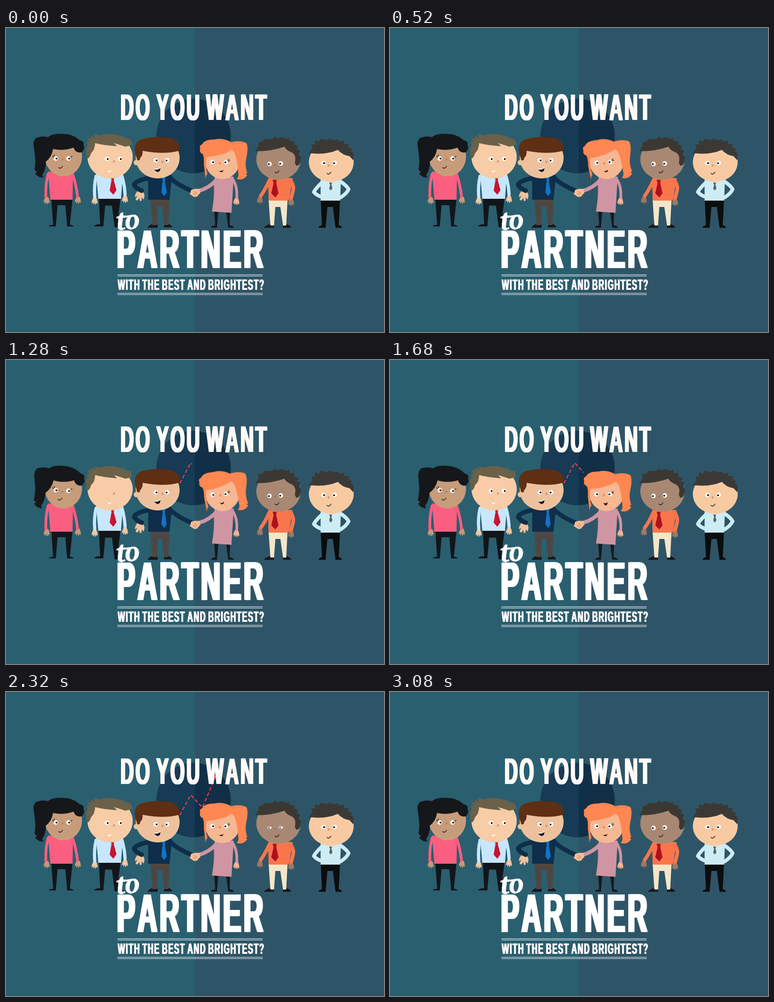
Animation, 835 px wide and 671 px high, one loop 3.12 s. Source, as an HTML page:

```html
<!DOCTYPE html>
<html lang="en">
<head>
<meta charset="utf-8">
<title>Partner</title>
<style>
@property --d { syntax: "<number>"; inherits: true; initial-value: 0; }

html, body { margin: 0; width: 100%; height: 100%; overflow: hidden; background: #2e5567; }
.stage { position: relative; width: 835px; height: 671px; overflow: hidden; }
svg { position: absolute; inset: 0; }

/* Narrow heavy lettering shared by all three lines */
.line {
  position: absolute; white-space: nowrap; color: #fff;
  font: bold 1px/1 "Liberation Sans", Arial, sans-serif;
  font-kerning: none; letter-spacing: .1em; word-spacing: -.113em;
  transform: scaleX(.496); transform-origin: 0 0;
  text-shadow: .044em 0, -.044em 0, .022em 0, -.022em 0;
}
.ask { left: 253px; top: 134px; font-size: 81.4px; color: #fffaf7; }
.big { left: 244.5px; top: 427.6px; font-size: 121px; letter-spacing: .092em; }
.tail { left: 247px; top: 549.2px; font-size: 34px; }
.to {
  position: absolute; left: 244px; top: 389px; color: #fff;
  font: italic bold 66px/1 "Liberation Serif", "Times New Roman", serif;
  -webkit-text-stroke: .8px #fff;
  transform: rotate(-4deg);
}
.to::before {
  content: ""; position: absolute; left: 0; top: 25px; width: 40px; height: 4px;
  border-radius: 2px; background: #fff; transform: rotate(-3deg);
}
.rule { position: absolute; left: 246px; width: 321px; height: 2px; border: solid #fff; border-width: 1px 0; }

.arm { fill: none; stroke-linecap: round; stroke-linejoin: round; }
.nose { fill: none; stroke: #a5593c; stroke-width: 1; stroke-linecap: round; }
.smile { fill: none; stroke: #1b1210; stroke-width: 1.5; stroke-linecap: round; }

.eyes { transform-box: fill-box; transform-origin: center; animation: blink 3120ms linear infinite; }
.tilt { animation: 3120ms ease-in-out infinite; }
.left-girl { transform-origin: 124px 284px; animation-name: nod; }
.red-girl { transform-origin: 478px 292px; animation-name: sway; }
.open { animation: talk 3120ms step-end infinite; }
.closed { animation: hush 3120ms step-end infinite; }
.graph { animation: grow 3120ms linear infinite, fade 3120ms linear infinite; }
.reveal { stroke-dasharray: 100 200; stroke-dashoffset: calc((100 - var(--d)) * 1px); animation: grow 3120ms linear infinite; }
.head {
  offset-path: path("M384 272L408 227L434 255L463 186");
  offset-distance: calc(var(--d) * 1%);
  animation: head 3120ms step-end infinite;
}

@keyframes blink { 0%, 7.7%, 100% { transform: none; } 2.6%, 5.1% { transform: scaleY(0); } }
@keyframes nod { 0%, 18%, 71.5%, 100% { transform: none; } 25%, 64% { transform: rotate(3.5deg); } }
@keyframes sway { 0%, 1.3%, 53%, 100% { transform: none; } 7%, 43.6% { transform: rotate(-4deg); } }
@keyframes talk { 0%, 61% { opacity: 0; } 50% { opacity: 1; } }
@keyframes hush { 0%, 61% { opacity: 1; } 50% { opacity: 0; } }
@keyframes grow {
  0%, 17.9% { --d: 0; }
  25.6% { --d: 21.3; }
  33.3%, 43.6% { --d: 31; }
  53.8% { --d: 48.8; }
  57.7% { --d: 54.4; }
  70.5%, 100% { --d: 100; }
}
@keyframes fade { 0%, 86% { opacity: 1; } 96%, 100% { opacity: 0; } }
@keyframes head { 0%, 33% { opacity: 0; } 19%, 60% { opacity: 1; } }
</style>
</head>
<body>
<div class="stage">
<svg width="835" height="671" viewBox="0 0 835 671">
  <defs>
    <g id="eye-r"><circle r="4.9" fill="#fff"/><circle cx="1.6" cy=".3" r="2.1" fill="#17120f"/></g>
    <g id="eye-l"><circle r="4.9" fill="#fff"/><circle cx="-1.4" cy=".5" r="2.1" fill="#17120f"/></g>
    <path id="hand" d="M-3-7H3Q6-3 6 2Q7 6 5 7Q3 6 3 3Q3 8 1 9Q-1 8 0 3Q-2 8-4 8Q-5 6-3 2Q-5 6-7 5Q-7 1-3-7Z"/>
    <path id="nose" class="nose" d="M-1-2Q2-3 2 0Q1 2-1 1"/>
    <path id="smile" class="smile" d="M-5 0Q0 4 4-3"/>
    <mask id="drawn" maskUnits="userSpaceOnUse" x="0" y="0" width="835" height="671">
      <path class="reveal" pathLength="100" d="M384 272L408 227L434 255L463 186" fill="none" stroke="#fff" stroke-width="8"/>
    </mask>
  </defs>

  <path fill="#2a5f70" d="M0 0H417.5V671H0Z"/>
  <path fill="#2e5567" d="M417.5 0H835V671H417.5Z"/>
  <circle cx="414.5" cy="238.5" r="82" fill="#112f46"/>
  <path fill="#173a55" d="M417.5 156.55A82 82 0 1 0 417.5 320.45Z"/>

  <g class="graph">
    <path mask="url(#drawn)" d="M384 272L408 227L434 255L463 186" fill="none" stroke="#f23d57" stroke-width="2.4" stroke-dasharray="8 5"/>
    <path class="head" d="M-3-3L4 0L-3 3Z" fill="#f23d57"/>
  </g>

  <!-- Woman in pink -->
  <g>
    <path fill="#12161a" d="M100 376H147L141 434Q149 435 149 438H135L131 391H114L110 438H94Q95 435 104 434Z"/>
    <g fill="#c59a7a"><use href="#hand" x="90" y="380"/><use href="#hand" x="159" y="379"/></g>
    <path fill="#fb5f80" d="M93 317H148L147 379H98Z"/>
    <path class="arm" stroke="#fb5f80" stroke-width="6" d="M93 322Q87 345 88 373M147 322Q155 345 158 372"/>
    <g class="tilt left-girl">
      <ellipse cx="127" cy="284" rx="41" ry="43.500" fill="#c79c7b"/>
      <path fill="#15171a" d="M88 295Q101 285 104 267Q128 272 149 264Q154 276 164 275Q171 274 169 271Q175 266 171 259Q174 250 163 248C150 236 136 233 118 233.500Q99 234 93 241Q80 237 66 243Q58 251 62 267Q67 295 63 314Q72 317 64 321Q71 331 84 330Q78 327 82 321Q88 311 88 295Z"/>
      <use href="#eye-r" x="110" y="288"/><use href="#eye-r" x="138" y="288"/>
      <path class="smile" d="M105 285l-2-2M107 283l-1-3M143 285l3-2"/>
      <use href="#nose" x="124" y="291"/><use href="#smile" x="121" y="308"/>
    </g>
  </g>

  <!-- Man with red tie -->
  <g>
    <path fill="#12161a" d="M205 374H253L246 433Q259 436 259 440H240L234 392H219L215 438H195Q196 433 208 433Z"/>
    <g fill="#f4c7a0"><use href="#hand" x="196" y="381"/><use href="#hand" x="263" y="377"/></g>
    <path fill="#c8e6fc" d="M199 322H258L254 377H204Z"/>
    <path class="arm" stroke="#c8e6fc" stroke-width="7" d="M199 327Q194 348 196 373M256 326Q262 346 263 368"/>
    <path fill="#c91430" d="M232 329H239L238 336L244 358L237 368L229 359L233 336Z"/>
    <ellipse cx="230" cy="285" rx="50" ry="47" fill="#f7cca6"/>
    <path fill="#6b6048" d="M179 287L176 265L181 260L178 253L184 252L180 242L188 244L187 238L195 241L196 234L206 237Q235 230 254 239L261 236L260 242L276 246L279 258L264 262L239 254L245 261Q215 259 197 254Q196 270 188 276Q184 290 179 287Z"/>
    <g class="eyes" style="animation-delay:-1960ms"><use href="#eye-r" x="223" y="289"/><use href="#eye-r" x="252" y="289"/></g>
    <use href="#nose" x="238" y="295"/>
    <path fill="#fff" d="M224 315Q229 317 233 313Q232 319 227 318Z"/>
  </g>

  <!-- Man in navy -->
  <g>
    <path fill="#16191c" d="M324 432H335V441H313Q314 436 324 432ZM349 432H359Q367 436 367 440H349Z"/>
    <path fill="#4d4643" d="M319 376H361L359 435H349L345 394H335L334 435H323Z"/>
    <path fill="#f2c09a" d="M290 360H303L306 370L304 379L300 374L299 382L295 381L295 375L290 381L286 379L290 370L285 374Q284 368 290 360Z"/>
    <path class="arm" stroke="#0e2e4b" stroke-width="10" d="M319 331Q289 335 283 346Q288 355 300 359M358 327Q379 347 409 359"/>
    <path fill="#0e2e4b" d="M314 325H367L361 379H314Z"/>
    <path fill="#1274c4" d="M345 329H352L351 338L355 362L350 371L343 363L346 338Z"/>
    <circle cx="288" cy="297" r="6" fill="#eec19d"/>
    <ellipse cx="335" cy="287" rx="48.500" ry="45" fill="#eec19d"/>
    <path fill="#5f2e13" d="M290 292L285 274Q282 251 301 245C322 239 352 239 369 245C382 250 386 262 382 271Q350 280 302 271Q302 283 296 287Q297 293 290 292Z"/>
    <g class="eyes" style="animation-delay:-3000ms"><use href="#eye-r" x="331" y="292"/><use href="#eye-l" x="356" y="292"/></g>
    <use href="#nose" x="345" y="296"/>
    <path fill="#21110e" d="M327 309Q335 312 341 306Q342 317 335 318Q329 317 327 309Z"/>
    <path fill="#fff" d="M327 309Q335 312 341 306V309Q335 314 328 312Z"/>
  </g>

  <!-- Woman with red hair -->
  <g>
    <path fill="#16191c" d="M460 404H469L466 441H452Q454 437 462 435ZM486 404H495L494 435Q503 437 504 441H491Z"/>
    <path class="arm" stroke="#cf95a3" stroke-width="8" d="M464 336Q450 352 428 359"/>
    <path fill="#f4bb95" d="M409 357L417 355L428 355L429 364L422 372Q416 375 411 370L406 367Z"/>
    <path class="nose" d="M416 361l6 4M414 365l5 4"/>
    <use href="#hand" x="509" y="382" fill="#f4b48e"/>
    <path class="arm" stroke="#cf95a3" stroke-width="6" d="M502 335Q511 350 510 374"/>
    <path fill="#cf95a3" d="M461 328H503L498 408L455 405Q461 370 459 345Z"/>
    <g class="tilt red-girl">
      <ellipse cx="478" cy="291" rx="39" ry="42.500" fill="#f6b793"/>
      <path fill="#ff8751" d="M441 333L437 301Q438 287 435 279Q426 274 429 267Q426 259 433 257Q438 246 461 246Q480 242 497 252Q517 247 531 254Q536 264 531 286Q527 304 533 320Q527 322 533 325Q524 338 509 333Q515 329 513 319Q512 300 506 278Q502 271 499 269Q478 282 443 285Q440 304 445 322Q441 325 441 333Z"/>
      <use href="#eye-r" x="456" y="296"/><use href="#eye-l" x="486" y="296"/>
      <path class="smile" d="M490 292l3-2M491 294l3-1"/>
      <use href="#nose" x="472" y="299"/>
      <path class="closed" fill="#2a1512" d="M470 315Q476 317 480 313Q480 319 474 318Z"/>
      <path class="open" fill="#2a1512" d="M471 315Q476 318 481 314Q480 322 475 321Z"/>
    </g>
  </g>

  <!-- Man in orange -->
  <g>
    <path fill="#16191c" d="M583 433H592V441H570Q572 436 583 433ZM612 433H620Q630 437 630 441H612Z"/>
    <path fill="#f5e6c8" d="M580 378H622L619 436H612L606 395H595L592 436H584Z"/>
    <g fill="#9f7a66"><use href="#hand" x="561" y="379"/><use href="#hand" x="630" y="384"/></g>
    <path class="arm" stroke="#f9764d" stroke-width="8" d="M581 338Q573 356 563 370M629 336Q637 351 634 359L630 375"/>
    <path fill="#f9764d" d="M579 331H633L625 381H580Z"/>
    <path fill="#ad1020" d="M589 335H598L597 343L602 365L595 374L586 365L591 343Z"/>
    <ellipse cx="602" cy="290" rx="49" ry="45" fill="#a88873"/>
    <path fill="#3b3833" d="M551 272L558 260L558 252L567 250L573 244L583 246L595 240L600 244L612 240L614 244L626 243L626 249L638 250L637 257L646 261L643 267L650 271L648 278L652 286Q651 304 641 304L638 297Q642 281 632 275Q619 270 615 262Q588 272 551 272Z"/>
    <g class="eyes" style="animation-delay:-840ms"><use href="#eye-l" x="582" y="300"/><use href="#eye-l" x="607" y="299"/></g>
    <use href="#nose" x="594" y="303"/><use href="#smile" x="599" y="318"/>
  </g>

  <!-- Man with hands on hips -->
  <g>
    <path fill="#0c0d0f" d="M695 378H738L735 435Q742 437 742 441H728L722 395H710L706 441H690Q691 437 698 435Z"/>
    <path class="arm" stroke="#cdecf4" stroke-width="8" d="M698 341Q684 354 680 362Q687 370 698 373M736 337Q752 347 757 356Q752 366 739 374"/>
    <path fill="#cdecf4" d="M695 333H740L738 381H695Z"/>
    <path fill="#5b5f60" d="M714 341H720L719 346L721 354L717 359L714 354L716 346Z"/>
    <ellipse cx="718.500" cy="296" rx="49.500" ry="43.500" fill="#f8caa2"/>
    <path fill="#3b3936" d="M669 276L677 265L674 257L682 257L682 248L691 251L696 244L706 248L716 244L721 248L734 246L735 251L746 249L747 255L757 257L756 263L764 266L762 272L768 277L767 292L759 283Q744 281 733 269Q706 281 669 276Z"/>
    <use href="#eye-r" x="701" y="298"/><use href="#eye-l" x="726" y="298"/>
    <use href="#nose" x="712" y="304"/><use href="#smile" x="714" y="321"/>
  </g>
</svg>

<div class="line ask">DO YOU WANT</div>
<div class="to">to</div>
<div class="line big">PARTNER</div>
<div class="rule" style="top:544px"></div>
<div class="line tail">WITH THE BEST AND BRIGHTEST?</div>
<div class="rule" style="top:585px"></div>
</div>
</body>
</html>
```
